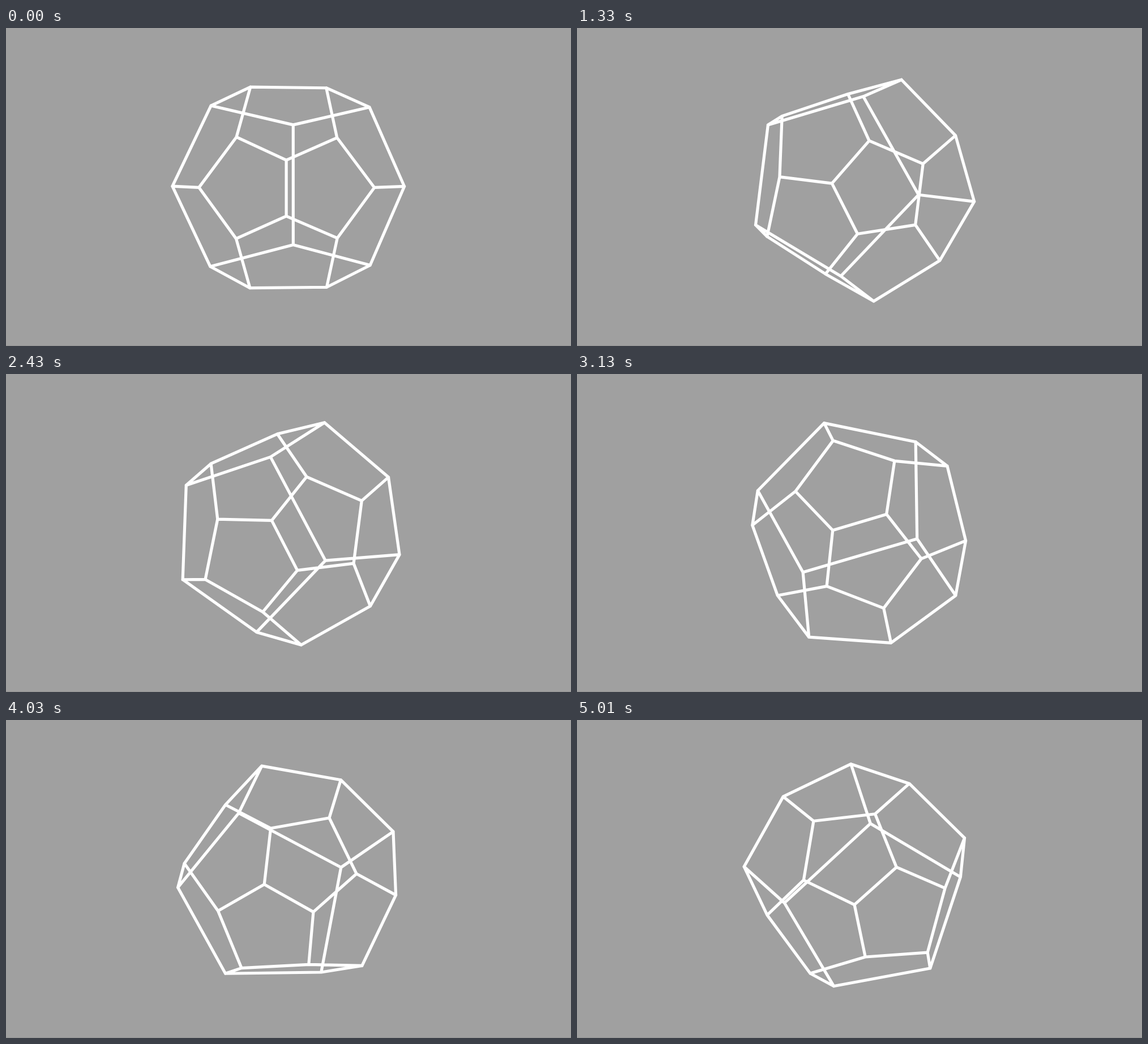
An HTML page with a canvas for the animation above (5.05 s loop, 998 by 561 pixels).

```html
<!DOCTYPE html>
<html lang="en">
<head>
<meta charset="utf-8">
<title>Rotating dodecahedron</title>
<style>
  html, body { margin: 0; width: 100%; height: 100%; overflow: hidden; background: #a0a0a0; }
  canvas { display: block; }
</style>
</head>
<body>
<canvas id="stage" width="998" height="561"></canvas>
<script>
const W = 998, H = 561;
const LOOP = 5050, STEP = 100 / 3, LAST = 150;
const TURN_X = 0.015, TURN_Y = 0.03;         // radians per step
const FOCAL = H / 2 / Math.tan(Math.PI / 6); // 60 degree field of view
const SIZE = H * 7 / 36;
const PHI = (1 + Math.sqrt(5)) / 2;

const ctx = document.getElementById('stage').getContext('2d');

function makeVertices() {
  const list = [];
  for (const a of [-1, 1]) for (const b of [-1, 1]) {
    for (const c of [-1, 1]) list.push([a, b, c]);
    const s = a / PHI, l = b * PHI;
    list.push([0, s, l], [s, l, 0], [l, 0, s]);
  }
  return list;
}

// Neighbouring vertices are 2 / PHI apart.
function makeEdges(points) {
  const edges = [];
  points.forEach((p, i) => points.forEach((q, j) => {
    const gap = Math.hypot(p[0] - q[0], p[1] - q[1], p[2] - q[2]);
    if (i < j && gap < 1.3) edges.push([i, j]);
  }));
  return edges;
}

const vertices = makeVertices();
const edges = makeEdges(vertices);

function project([x, y, z], ax, ay) {
  const x1 = x * Math.cos(ay) + z * Math.sin(ay);
  const z1 = z * Math.cos(ay) - x * Math.sin(ay);
  const y2 = y * Math.cos(ax) - z1 * Math.sin(ax);
  const z2 = y * Math.sin(ax) + z1 * Math.cos(ax);
  const k = SIZE * FOCAL / (FOCAL - SIZE * z2);
  return [W / 2 + x1 * k, H / 2 + y2 * k];
}

function draw(time) {
  const turns = Math.min(LAST, Math.floor((time % LOOP + 5) / STEP)) + 1;
  const points = vertices.map(v => project(v, turns * TURN_X, turns * TURN_Y));

  ctx.fillStyle = '#a0a0a0';
  ctx.fillRect(0, 0, W, H);
  ctx.fillStyle = '#949494';
  ctx.fillRect(0, H - 1, W, 1);

  ctx.strokeStyle = '#fff';
  ctx.lineWidth = 5.2;
  ctx.lineCap = 'round';
  ctx.beginPath();
  for (const [i, j] of edges) {
    ctx.moveTo(...points[i]);
    ctx.lineTo(...points[j]);
  }
  ctx.stroke();
}

const start = performance.now();
function tick() {
  draw(performance.now() - start);
  requestAnimationFrame(tick);
}
tick();
</script>
</body>
</html>
```
